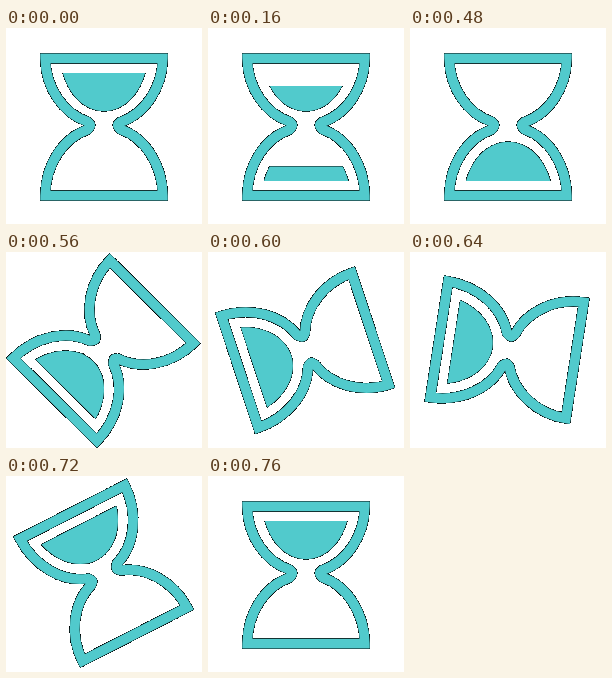
Write an HTML page with a canvas that moves like this. It is 196 by 196 pixels and loops after 0.8 s.

```html
<!DOCTYPE html>
<html lang="en">
<head>
<meta charset="utf-8">
<title>Hourglass</title>
<style>
  html, body { margin: 0; width: 100%; height: 100%; overflow: hidden; background: #fff; }
  canvas { display: block; }
</style>
</head>
<body>
<canvas width="196" height="196"></canvas>
<script>
const SIZE = 196, LOOP = 800, STEP = 40, LAST = LOOP / STEP - 1;
const FLIP_START = 0.65;
const COLOR = [81, 202, 204];
const ctx = document.querySelector('canvas').getContext('2d', { willReadFrequently: true });

const glass = new Path2D('M58.4 51.7c-.9-.9-1.4-2-1.4-2.3s.5-.4 1.4-1.4C70.8 43.8 79.8 30.5 80 15.5H20' +
  'c.2 15 9.2 28.1 21.6 32.3c.9.9 1.4 1.2 1.4 1.5s-.5 1.6-1.4 2.5C29.2 56.1 20.2 69.5 20 85.5h60' +
  'C79.8 69.5 70.8 55.9 58.4 51.7z');
const upperSand = new Path2D('M29 23c3.1 11.4 11.3 19.5 21 19.5S67.9 34.4 71 23z');
const lowerSand = new Path2D('M71.6 78c-3-11.6-11.5-20-21.5-20s-18.5 8.4-21.5 20z');

function fillBetween(path, top, bottom) {
  if (top >= bottom) return;
  ctx.save();
  ctx.beginPath();
  ctx.rect(15, top, 70, bottom - top);
  ctx.clip();
  ctx.fill(path);
  ctx.restore();
}

// Opaque pixels whose partly covered edges fade to black
function hardenEdges() {
  const image = ctx.getImageData(0, 0, SIZE, SIZE), px = image.data;
  for (let i = 0; i < px.length; i += 4) {
    const cover = px[i + 3] / 255;
    if (!cover) continue;
    COLOR.forEach((c, k) => { px[i + k] = c * cover; });
    px[i + 3] = 255;
  }
  ctx.putImageData(image, 0, 0);
}

function draw(progress) {
  const fall = Math.min(progress / FLIP_START, 1);
  const flip = Math.max((progress - FLIP_START) / (1 - FLIP_START), 0);
  ctx.clearRect(0, 0, SIZE, SIZE);
  ctx.save();
  ctx.scale(SIZE / 100, SIZE / 100);
  ctx.translate(50, 50);
  ctx.rotate(flip * Math.PI);
  ctx.translate(-50, -50);
  ctx.fillStyle = ctx.strokeStyle = `rgb(${COLOR})`;
  ctx.lineWidth = 5;
  ctx.stroke(glass);
  fillBetween(upperSand, 23 + 20.5 * fall, 45);
  fillBetween(lowerSand, 78 - 22.5 * fall, 80);
  ctx.restore();
  hardenEdges();
}

function tick() {
  const step = Math.floor(performance.now() % LOOP / STEP);
  draw(step === LAST ? 0 : step / LAST);
  requestAnimationFrame(tick);
}
tick();
</script>
</body>
</html>
```
